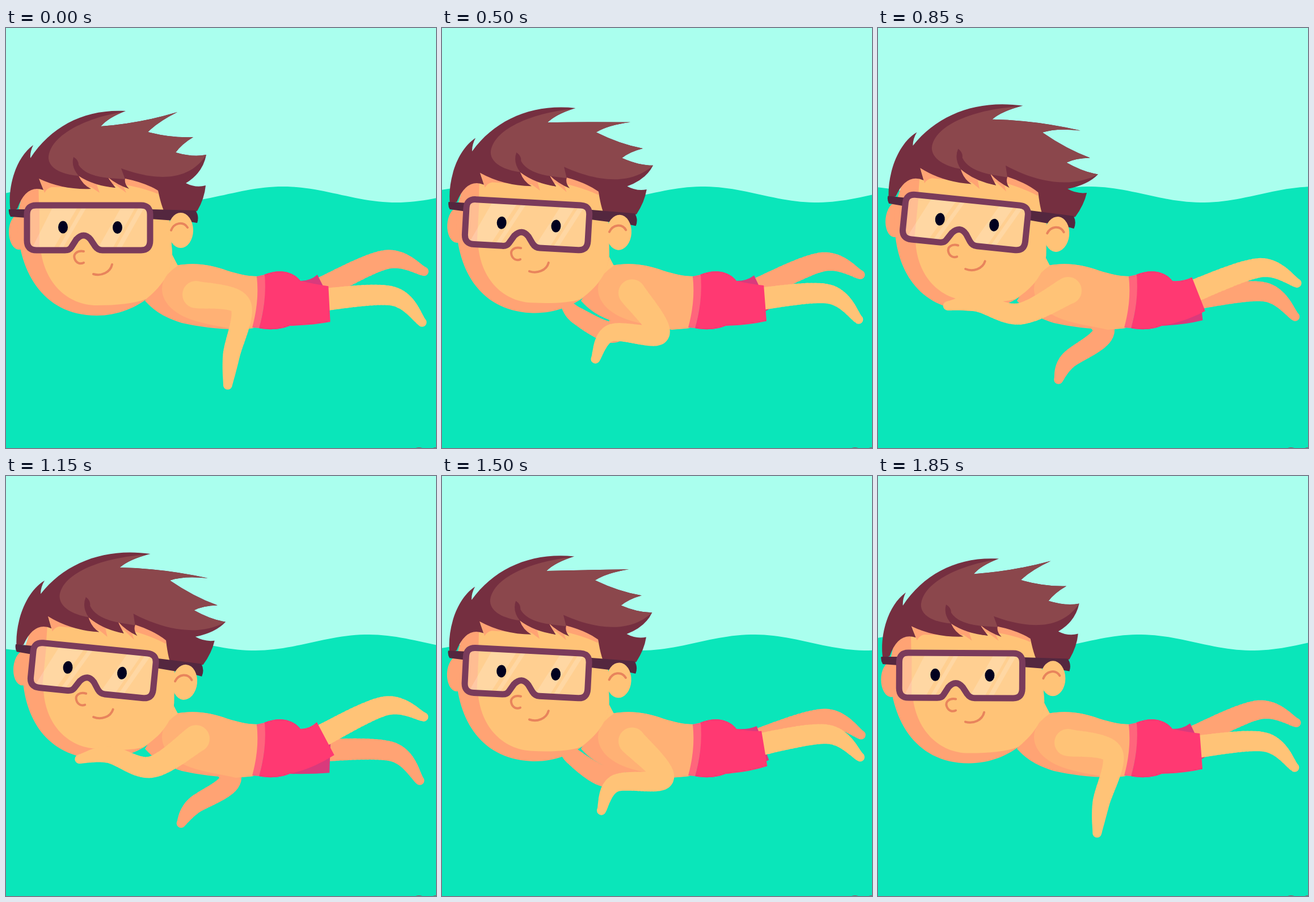
Recreate the animation shown at these times as an HTML page. Size 758 px wide and 739 px high, loop 1900 ms.

```html
<!DOCTYPE html>
<html lang="en">
<head>
<meta charset="utf-8">
<title>Swimmer</title>
<style>
  html, body { margin: 0; width: 100%; height: 100%; overflow: hidden; background: #aaffee; }
  svg { display: block; width: 100%; height: 100%; }
  .water { fill: #0ae6ba; }
  .skin { fill: #ffc377; }
  .shade { fill: #ffa374; }
  .torso { fill: #ffb175; }
  .shorts { fill: #ff3972; }
  .shorts-far { fill: #d93a7c; }
  .band { fill: #ff657c; }
  .hair { fill: #8b474c; }
  .hair-dark { fill: #752f40; }
  .strap { fill: #54273f; }
  .frame { fill: none; stroke: #7a3b5b; stroke-width: 11; stroke-linejoin: round; }
  .eye { fill: #01011f; }
  .line { fill: none; stroke: #e8845c; stroke-width: 4; stroke-linecap: round; }
</style>
</head>
<body>
<svg viewBox="0 0 758 739" preserveAspectRatio="none">
  <defs>
    <path id="lens" d="M53,312 H238 Q254,312 254,328 V374 Q254,391 238,391 H170 Q162,391 157,384 L149,372 Q137,358 124,372 L115,386 Q112,391 104,391 H54 Q37,391 37,374 V328 Q37,312 53,312Z"/>
    <clipPath id="inLens"><use href="#lens"/></clipPath>
  </defs>
  <path id="wave" class="water"/>
  <g fill="#a8445f"><ellipse cx="728" cy="741" rx="8" ry="3"/><ellipse cx="757" cy="741" rx="6" ry="3"/></g>

  <path id="farLeg" class="shade"/>
  <path id="farShorts" class="shorts-far"/>
  <path id="nearLeg" class="skin"/>
  <path id="farArm" class="shade"/>

  <path class="shade" d="M245,480 C260,455 280,440 300,418 C330,412 360,416 390,427 C410,433 425,437 444,437 Q448,485 436,528 C400,533 350,528 310,519 C280,510 260,497 245,480Z"/>
  <path class="torso" d="M300,418 C330,412 360,416 390,427 C410,433 425,437 444,437 Q448,485 436,528 L405,531 C370,522 325,520 296,497 C265,472 270,440 300,418Z"/>
  <path id="nearShorts" class="shorts"/>
  <path class="band" d="M442,437 L456,434 Q460,480 446,528 L434,527 Q447,480 442,437Z"/>
  <path class="skin" d="M286,385 Q296,405 303,418 Q285,430 272,450 L262,440Z"/>

  <g id="head">
    <ellipse class="shade" cx="23" cy="359" rx="18" ry="31"/>
    <path class="shade" d="M20,330 C18,420 60,506 160,506 C230,506 293,455 293,395 L285,300 L270,230 L40,240Z"/>
    <path class="skin" d="M57,270 L60,380 C65,450 110,488 160,488 C195,488 225,485 247,477 C280,450 293,425 293,395 L285,300 L270,230Z"/>
  </g>
  <g id="hair">
    <path class="shade" d="M58,262 L68,290 Q72,282 80,280 L150,280 L165,290 L160,276 L193,276 L212,290 L205,275 Q245,282 268,292 L268,270 L200,255Z"/>
    <path class="hair-dark" d="M8,322 C2,285 15,230 48,206 Q42,218 43,229 C80,172 140,142 211,146 Q180,158 167,173 Q235,168 302,148 Q268,165 250,183 Q292,194 330,192 Q310,204 299,219 Q330,228 353,223 Q347,255 317,273 Q335,282 352,277 Q350,300 337,322 L285,335 Q275,320 268,286 Q245,272 210,265 Q208,274 217,283 Q196,276 180,263 Q186,274 193,281 Q155,278 128,260 Q135,276 150,283 Q100,285 58,265 Q62,275 66,285 Q35,275 20,318Z"/>
    <path class="hair" d="M205,148 C140,158 75,190 75,230 C77,248 100,258 128,260 Q150,272 180,264 L210,266 L203,247 C255,266 320,275 353,223 Q330,228 299,219 Q310,204 330,192 Q292,194 250,183 Q268,165 302,148 Q235,168 167,173 Q180,158 205,148Z"/>
    <path class="hair-dark" d="M119,227 Q128,232 128,241 Q140,260 180,264 L193,281 Q150,275 128,260 Q114,244 119,227Z"/>
  </g>
  <g id="face">
    <path class="strap" d="M5,319 H36 V334 L8,332 Q4,326 5,319Z M255,319 L334,321 Q341,331 337,343 L325,341 L255,336Z"/>
    <ellipse class="skin" cx="308" cy="356" rx="22" ry="31"/>
    <path class="line" d="M291,356 C296,343 312,339 320,351"/>
    <g clip-path="url(#inLens)">
      <rect x="30" y="300" width="235" height="100" fill="#ffcf91"/>
      <rect x="30" y="300" width="29" height="100" fill="#ffbd92"/>
      <path fill="#fff" opacity=".16" d="M84,312 H128 L82,391 H44Z M136,312 H144 L98,391 H90Z M205,312 H230 L186,391 H160Z M236,312 H246 L201,391 H192Z"/>
    </g>
    <use href="#lens" class="frame"/>
    <path id="eyeL" class="eye"/>
    <path id="eyeR" class="eye"/>
    <path class="line" d="M137,393 C125,391 118,398 121,406 C124,414 131,416 137,413 M154,433 C168,437 184,430 187,416"/>
  </g>
  <path id="nearArm" class="skin"/>
</svg>
<script>
const LOOP = 1900, STEP = 50, TAU = Math.PI * 2;
const $ = id => document.getElementById(id);
const draw = (id, d) => $(id).setAttribute('d', d);
const lerp = (a, b, t) => a + (b - a) * t;

// Quadratic through three values, the middle one reached at t = MID.
const MID = .4;
function through([a, b, c], t) {
  const first = (b - a) / MID, second = (c - b) / (1 - MID);
  return a + first * t + (second - first) * t * (t - MID);
}

// End of a bone as [x, y, radius].
function bone([x, y], degrees, length, r) {
  const a = degrees * TAU / 360;
  return [x + length * Math.cos(a), y + length * Math.sin(a), r];
}

const spline = (p, q, r, s, t) => q + t / 2 * (r - p
  + t * (2 * p - 5 * q + 4 * r - s + t * (3 * (q - r) + s - p)));

// A tapering limb: overlapping discs along a smooth line through the joints.
function tube(joints, discs = 20) {
  const at = i => joints[Math.max(0, Math.min(joints.length - 1, i))];
  let d = '';
  for (let i = 0; i < joints.length - 1; i++)
    for (let k = 0; k <= discs; k++) {
      const [x, y, r] = [0, 1, 2].map(j =>
        spline(at(i - 1)[j], at(i)[j], at(i + 1)[j], at(i + 2)[j], k / discs));
      d += `M${x - r},${y}a${r},${r} 0 1 0 ${2 * r},0a${r},${r} 0 1 0 ${-2 * r},0`;
    }
  return d;
}

function leg(k) {
  const hip = [555, lerp(457, 483, k), 20];
  const knee = bone(hip, lerp(-26, 2, k), 126, 17);
  return tube([hip, knee, bone(knee, lerp(15, 47, k), 70, 8)]);
}

function arm(shoulder, upper, lower, hand, angles) {
  const elbow = bone(shoulder, angles[0], upper, 19);
  const wrist = bone(elbow, angles[1], lower, 15);
  return tube([shoulder, elbow, wrist, bone(wrist, angles[2], hand, 8)]);
}

function nearArm(t) {
  const angles = [[13, 56, 154], [100, 180, 194], [97, 120, 175]].map(a => through(a, t));
  return arm([335, lerp(469, 462, t), 24], lerp(80, 94, t), lerp(90, 77, t), 53, angles);
}

function farArm(t) {
  const angles = [[200, 102, 42], [250, 203, 139], [250, 230, 117]].map(a => through(a, t));
  return arm([320, 460, 20], lerp(55, 105, t), lerp(65, 84, t), 37, angles);
}

function shorts(k) {
  const x1 = lerp(547, 573, k), y1 = lerp(432, 459, k);
  const x2 = lerp(579, 570, k), y2 = lerp(490, 523, k);
  return `M455,434 C480,424 505,427 519,445 Q${(519 + x1) / 2 + 3},${lerp(444, 453, k)} ${x1},${y1}
    L${x2},${y2} Q540,${lerp(515, 525, k)} 500,524 C480,532 460,531 446,528 Q460,480 455,434Z`;
}

// Hair turns with the head, and leans further back the higher a point lies.
function sway(x, y, u) {
  const h = 280 - y, lift = Math.max(h, 0);
  const dx = 15 + (h > 0 ? h * (.03 + .0009 * x) : h * .1);
  const dy = .101 * (x - 235) + lift * Math.max(-.05, .0039 * (x - 252));
  return [x + u * dx, y + u * dy];
}
const locks = [...$('hair').children].map(el => [el, el.getAttribute('d')]);

function wave(crest) {
  let d = 'M0,739';
  for (let x = 0; x <= 760; x += 8) d += `L${x},${293 - 14 * Math.cos(TAU * (x - crest) / 400)}`;
  return d + 'V739Z';
}

function eye(x, y, open) {
  if (open < .3) return `M${x - 8},${y - 4} q9,3 18,0 v7 q-9,-3 -18,0Z`;
  const r = 11 * open;
  return `M${x - 8.5},${y} a8.5,${r} 0 1 1 17,0 a8.5,${r} 0 1 1 -17,0Z`;
}

function render(ms) {
  const i = Math.floor(ms % LOOP / STEP);
  const u = (1 - Math.cos(TAU * (i + .3) / 40)) / 1.91;
  const reach = u ** 1.5;
  // Wave and kick share a clock that starts a little slowly.
  const turns = i / 9 - .18 * Math.min(1, i / 4);
  const beat = Math.cos(TAU * turns);
  const kick = .36 + .46 * beat, farKick = .6 - .53 * beat;

  draw('wave', wave(488 + 400 * turns));
  draw('farLeg', leg(farKick));
  draw('farShorts', shorts(farKick));
  draw('nearLeg', leg(kick));
  draw('nearShorts', shorts(kick));
  draw('farArm', farArm(reach));
  draw('nearArm', nearArm(reach));

  const turn = `rotate(${5.8 * u} 243 430)`;
  $('head').setAttribute('transform', turn);
  $('face').setAttribute('transform', turn);
  for (const [el, d] of locks)
    el.setAttribute('d', d.replace(/([\d.]+),([\d.]+)/g, (_, x, y) => sway(+x, +y, u)));

  const open = 1 - .8 * Math.max(0, 1 - Math.abs(i - 4) / 2);
  draw('eyeL', eye(100.5, 350.5, open));
  draw('eyeR', eye(196.5, 351, open));
}

const start = performance.now();
function tick() {
  render(performance.now() - start);
  requestAnimationFrame(tick);
}
tick();
</script>
</body>
</html>
```
